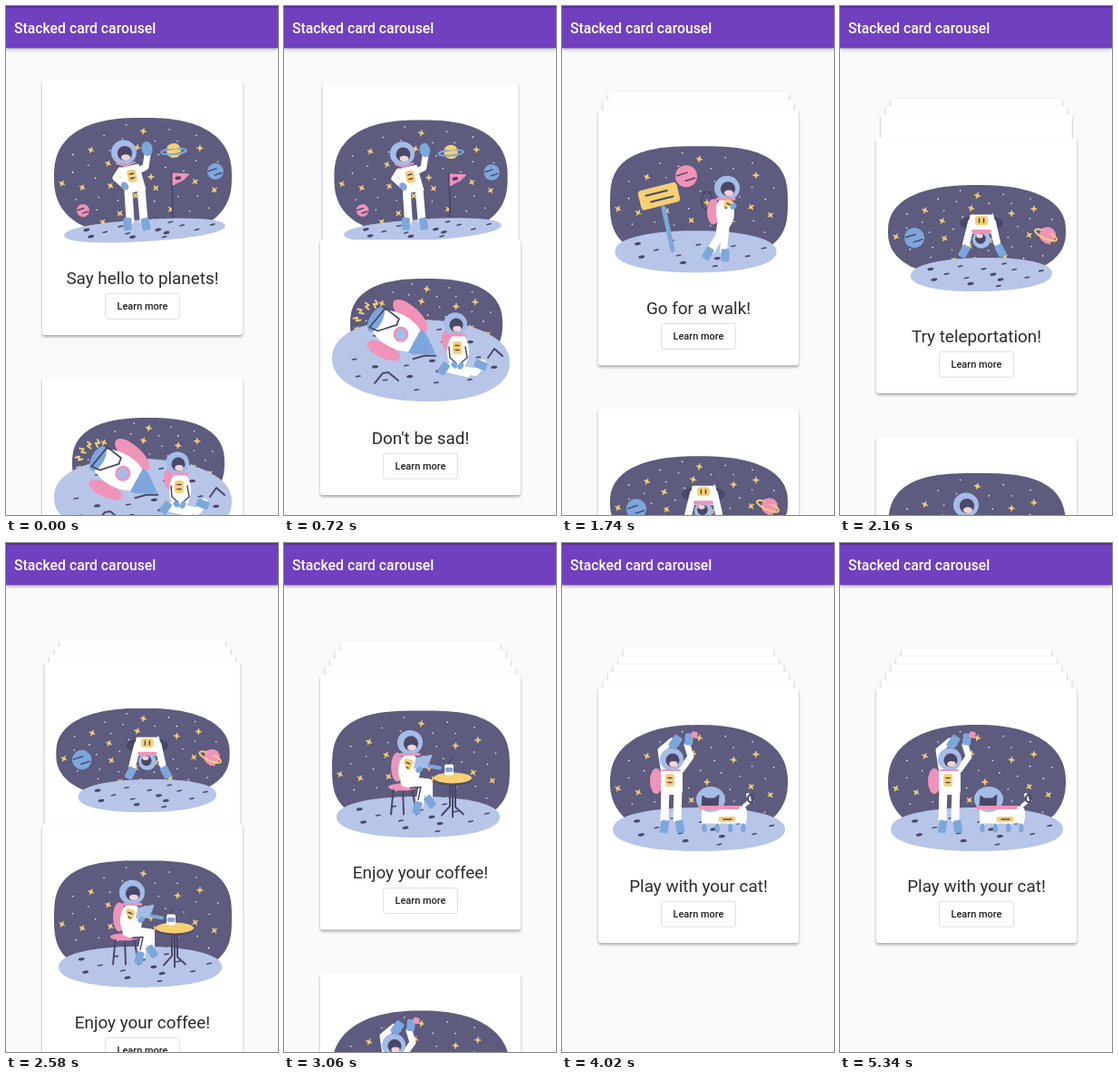
Recreate the animation shown at these times as an HTML page. Size 300 px wide and 560 px high, loop 5400 ms.

```html
<!DOCTYPE html>
<html lang="en">
<head>
<meta charset="utf-8">
<title>Stacked card carousel</title>
<style>
html, body { margin: 0; width: 100%; height: 100%; overflow: hidden; background: #fafafa }
svg { display: block; width: 300px; height: 560px; font-family: Roboto, sans-serif }
.card { fill: #fff; filter: drop-shadow(0 2.2px 1.6px rgba(0,0,0,.32)) }
.bar { filter: drop-shadow(0 1.5px 2px rgba(0,0,0,.35)) }
.head { font-size: 18.9px; fill: #2b2b2b; text-anchor: middle }
.label { font-size: 11px; font-weight: 500; fill: #212121; text-anchor: middle }
.title { font-size: 15.75px; font-weight: 500; fill: #fff }
.line { fill: none; stroke-linecap: round; stroke-linejoin: round }
</style>
</head>
<body>
<svg viewBox="0 0 300 560">
  <g id="deck"></g>
  <rect class="bar" width="300" height="46.3" fill="#7040be"/>
  <rect width="300" height="2" fill="#5b2f9f"/>
  <text class="title" x="9" y="30.4">Stacked card carousel</text>
</svg>
<script>
const white = '#fff', night = '#5d5b7e', ground = '#b7c5e8', glass = '#a5bce8', blue = '#7da7dc',
  pink = '#f093b8', yellow = '#f7d074', dark = '#4a4869', skin = '#f4d3d6';

const at = (x, y, turn, art) => `<g transform="translate(${x} ${y}) rotate(${turn})">${art}</g>`;
const oval = (x, y, rx, ry, fill, turn = 0) =>
  at(x, y, turn, `<ellipse rx="${rx}" ry="${ry}" fill="${fill}"/>`);
const ring = (x, y, rx, ry, color, turn = 0) =>
  at(x, y, turn, `<ellipse rx="${rx}" ry="${ry}" fill="none" stroke="${color}" stroke-width="2"/>`);
const box = (x, y, w, h, fill, turn = 0, r = 2) =>
  at(x, y, turn, `<rect x="${-w / 2}" y="${-h / 2}" width="${w}" height="${h}" rx="${r}" fill="${fill}"/>`);
const line = (pts, color = dark, w = 1.5) =>
  `<polyline class="line" points="${pts}" stroke="${color}" stroke-width="${w}"/>`;
const poly = (pts, fill) => `<polygon points="${pts}" fill="${fill}" stroke="${fill}" stroke-linejoin="round"/>`;
const repeat = (n, f) => Array.from({ length: n }, (_, i) => f(i)).join('');

// Superellipse about the origin
function egg(rx, ry, power, fill) {
  const bend = v => Math.sign(v) * Math.abs(v) ** (2 / power);
  const pts = Array.from({ length: 120 }, (_, i) => {
    const a = i * Math.PI / 60;
    return `${(rx * bend(Math.cos(a))).toFixed(1)},${(ry * bend(Math.sin(a))).toFixed(1)}`;
  });
  return `<polygon points="${pts.join(' ')}" fill="${fill}"/>`;
}
// Even spread of n items over an ellipse (sunflower order)
const spread = (n, rx, ry, f) => repeat(n, i => {
  const r = Math.sqrt((i + .5) / n), a = i * 2.4;
  return f(r * Math.cos(a) * rx, r * Math.sin(a) * ry, i);
});
const star = (x, y, i) => at(x, y, i * 37 % 60,
  `<path d="M0-3.6L.9-.9 3.6 0 .9.9 0 3.6-.9.9-3.6 0-.9-.9Z" fill="${yellow}" stroke="${yellow}" stroke-width=".6"/>`);
const sky = (x, y, rx, ry, power) => at(x, y, 0, egg(rx, ry, power, night) +
  spread(54, rx * .94, ry * .94, (u, v, i) => i % 3 ? oval(u, v, .8, .8, white) : star(u, v, i)));
const land = (x, y, rx, ry, turn = 0, n = 14) => at(x, y, turn, egg(rx, ry, 2.2, ground) +
  spread(n, rx * .88, ry * .8, (u, v, i) =>
    i % 3 ? box(u, v, 6, 1.6, dark, -10, 1) : ring(u, v, 2.5, .6, dark, -8)));

const planet = (x, y, r, color, band = dark) => at(x, y, -18,
  oval(0, 0, r, r, color) + line([-r * .8, -r * .3, r * .2, -r * .3], band) + line([-r * .2, r * .4, r * .7, r * .4], band));
const helmet = (x, y, r = 13) => at(x, y, 0, oval(0, 0, r, r * .97, glass) +
  oval(1, 1, r * .58, r * .58, dark) + oval(2, r * .4, r * .36, r * .24, skin));
const chest = (x, y, turn = 0) => at(x, y, turn,
  box(0, 0, 10, 14, yellow, 0, 3) + box(0, -2.5, 6, 1.6, dark) + box(0, 2.5, 6, 1.6, dark));
const boot = (x, y, turn = 0) => box(x, y, 9, 14, blue, turn);
const mitt = (x, y, turn = 0, size = 5) => oval(x, y, size * .75, size, blue, turn);

const rocket = at(125, 359, 29,
  oval(4, -22, 24, 10, pink, 13) + oval(-3, 26, 20, 8, pink, -4) +
  oval(-1, 0, 32, 19, white) + poly('22,-14 28,-13 48,1 28,13 22,14', blue) +
  oval(-27, 0, 7, 15, blue) + line('-29,11 -24,-16 -5,-13 -4,-6 -19,10 -29,11', dark, 1.8) +
  oval(5, 1, 8.5, 8.5, pink) + oval(5, 1, 6, 6, glass) + line('30,18 39,9 50,3', dark, 2)) +
  repeat(4, i => at(101, 350, 192 + i * 26, line('17,0 21,-2 21,2 25,0', yellow, 2)));

// Each scene is drawn at the place its card has when its top is at y
const cards = [
  { text: 'Say hello to planets!', y: 81, art:
    sky(151, 188, 98, 65, 2.5) + land(153, 247, 89, 12, -3.5) +
    planet(85, 225, 7, pink) + planet(231, 182, 9, blue) +
    oval(185, 159, 8, 8, yellow) + ring(185, 160, 14, 3, blue, -5) + line('180,155 189,155', yellow, 4) +
    line('183,184 184,232', dark, 2) + poly('184,184 202,185 196,191 184,197', pink) +
    oval(188.5, 189.5, 2, 2, dark) + oval(191, 189, 2, 2, dark) +
    line('146,181 154,177 156,164', white, 7) + mitt(155.5, 157, -12, 8) +
    line('135,205 137,236', white, 9) + line('149,200 152,236', white, 9) +
    poly('124,179 146,174 154,202 132,206', white) + line('126,181 121,189 129,196', white, 7) +
    mitt(131, 198, -40) + helmet(130, 161, 14) + line('122,173 131,176 142,172', pink, 2) +
    chest(139, 187, -12) + boot(134, 240) + boot(154, 240, -12) },

  { text: "Don't be sad!", y: 258, art:
    sky(157, 351, 84, 50, 2.5) + land(151, 391, 98, 45, 2, 24) + rocket +
    line('100,416 109,405 115,404 126,413', dark, 2) + line('225,388 232,378 241,386', dark, 2) +
    oval(181, 368, 7, 12, pink) + oval(192, 381, 12, 20, white) +
    line('183,398 211,404 219,394', white, 8) + line('181,401 202,406', white, 7) +
    line('182,376 183,388 190,394') + line('200,376 202,388 195,394') +
    helmet(189, 351) + line('180,363 200,363', pink, 3) + chest(191, 377) +
    mitt(188, 396, -40, 4) + mitt(195, 397, 30, 4) + boot(176, 400, 35) + boot(217, 396, -70) },

  { text: 'Go for a walk!', y: 283, art:
    sky(151, 385, 98, 62, 2.9) + land(147.5, 439, 89, 23) +
    line('112,391 122,437', blue, 5) + at(107, 378, -14,
      box(0, 0, 44, 22, yellow, 0, 4) + line('-14,-4 10,-4', dark, 2) + line('-10,4 15,4', dark, 2)) +
    planet(137, 356, 12, pink) + ring(160, 383, 6, 10, dark) + oval(167, 395, 7, 14, pink) +
    oval(180, 396, 10, 18, white) + line('176,405 174,421 164,438', white, 9) + line('181,407 178,438', white, 8) +
    helmet(182, 369, 14) + line('171,381 190,381', pink, 3) + chest(183, 389, 18) +
    line('173,389 180,397 187,391', white, 6) + mitt(189, 389, 45, 4) + boot(161, 441, 30) + boot(180, 443) },

  { text: 'Try teleportation!', y: 145, art:
    sky(151, 248, 98, 51, 2.4) + land(156, 295.5, 78, 18.5, -1) +
    planet(82, 255, 11, blue) + oval(229, 252, 9, 9, pink) + ring(227, 252, 13, 4, yellow, 24) +
    line('225,247 232,248', pink, 4) + oval(156, 239, 24, 9, dark) +
    poly('144,230 169,230 172,250 141,250', white) +
    line('145,238 139,262', white, 8) + line('168,238 173,260', white, 8) +
    chest(156, 236, 90) + at(156, 257, 180, helmet(0, 0, 10)) +
    line('147,248 165,248', pink, 4) + boot(137, 270, 28) + boot(177, 269, -28) },

  { text: 'Enjoy your coffee!', y: 144, art:
    sky(151, 247, 98, 63, 2.9) + land(148, 301, 90, 22.5) +
    repeat(3, i => line(`${121 + i * 10},268 ${118 + i * 14},298`, dark, 2)) +
    oval(131, 268, 16, 4, pink) + oval(125, 246, 7, 16, pink) + oval(138, 250, 12, 19, white) +
    line('133,263 154,263 149,288', white, 9) + line('143,261 160,263 160,280', white, 8) +
    line('139,269 151,268 148,282') + helmet(139, 219, 14) + line('129,232 149,232', pink, 3) +
    chest(136, 244, 20) + poly('146,236 163,233 158,246 143,249', glass) +
    line('130,243 134,253 147,250', white, 6) + mitt(149, 249, 60, 4) + line('160,245 172,247', blue, 4) +
    boot(147, 291, 15) + boot(161, 284, -35) +
    line('183,263 183,289 174,299', dark, 2) + line('189,263 189,290 198,298', dark, 2) + line('186,264 186,301', dark, 2) +
    oval(186, 260, 21, 6, dark) + oval(186, 258, 21, 6, yellow) +
    box(182, 249, 10, 12, white) + box(182, 249, 9, 5, blue) + line('181,242 185,237') },

  { text: 'Play with your cat!', y: 159, art:
    sky(151, 263, 98, 63, 2.3) + land(151, 315, 95, 24) +
    oval(104, 262, 7, 14, pink) + line('112,248 109,228 121,218', white, 7) + line('132,249 142,235 138,222', white, 7) +
    line('114,268 113,304', white, 9) + line('128,268 127,304', white, 9) + box(121, 262, 24, 30, white, 0, 5) +
    helmet(121, 238) + chest(119, 261) + line('111,250 130,250', pink, 2) +
    box(125, 219, 10, 15, blue, 35) + box(140, 216, 9, 13, blue, 5) + box(146, 211, 7, 7, pink, 15) +
    boot(113, 312, 10) + boot(130, 312, -10) +
    line('201,289 207,284 205,277', white, 4) + ring(208, 281, 3, 4, dark) + box(179, 299, 50, 19, white, 0, 6) +
    repeat(4, i => line([157 + i * 14.3, 303, 157 + i * 14.3, 309], white, 6) +
      line([157 + i * 14.3, 311, 157 + i * 14.3, 316], blue, 5)) +
    box(182, 304, 19, 6, yellow) + line('178,304 187,304') + oval(164, 282, 16, 14, glass) +
    poly('155,278 159,281 168,281 173,277 172,290 154,290', dark) + line('152,291 194,291', pink, 4) }
];

const deck = document.getElementById('deck');
deck.innerHTML = cards.map(c => `<g>
  <rect class="card" x="40" width="221" height="281" rx="3"/>
  <g transform="translate(0 ${-c.y})">${c.art}</g>
  <text class="head" x="150.5" y="225">${c.text}</text>
  <rect x="109.7" y="235.2" width="81.6" height="28" rx="2" fill="#fff" stroke="#dedede"/>
  <text class="label" x="150.5" y="253">Learn more</text></g>`).join('');

// One swipe: accelerating drag up to the halfway moment, then an exponential settle
function swipe(t) {
  if (t < -170) return 0;
  return t < 0 ? .5 * ((t + 170) / 170) ** 2 : 1 - .5 * Math.exp(-t / 95);
}

function draw(now) {
  const t = now % 5400;
  let page = 0;
  for (let i = 0; i < 5; i++) page += swipe(t - 723 - i * (600 + i * 7));
  [...deck.children].forEach((g, i) => {
    const top = 81 + 15.6 * i + Math.max(i - page, 0) * 313.4;
    const scale = 1 - .05 * Math.max(page - i, 0);
    g.setAttribute('transform', `translate(150.5 ${top + 140.5}) scale(${scale}) translate(-150.5 -140.5)`);
  });
  requestAnimationFrame(draw);
}
draw(performance.now());
</script>
</body>
</html>
```
